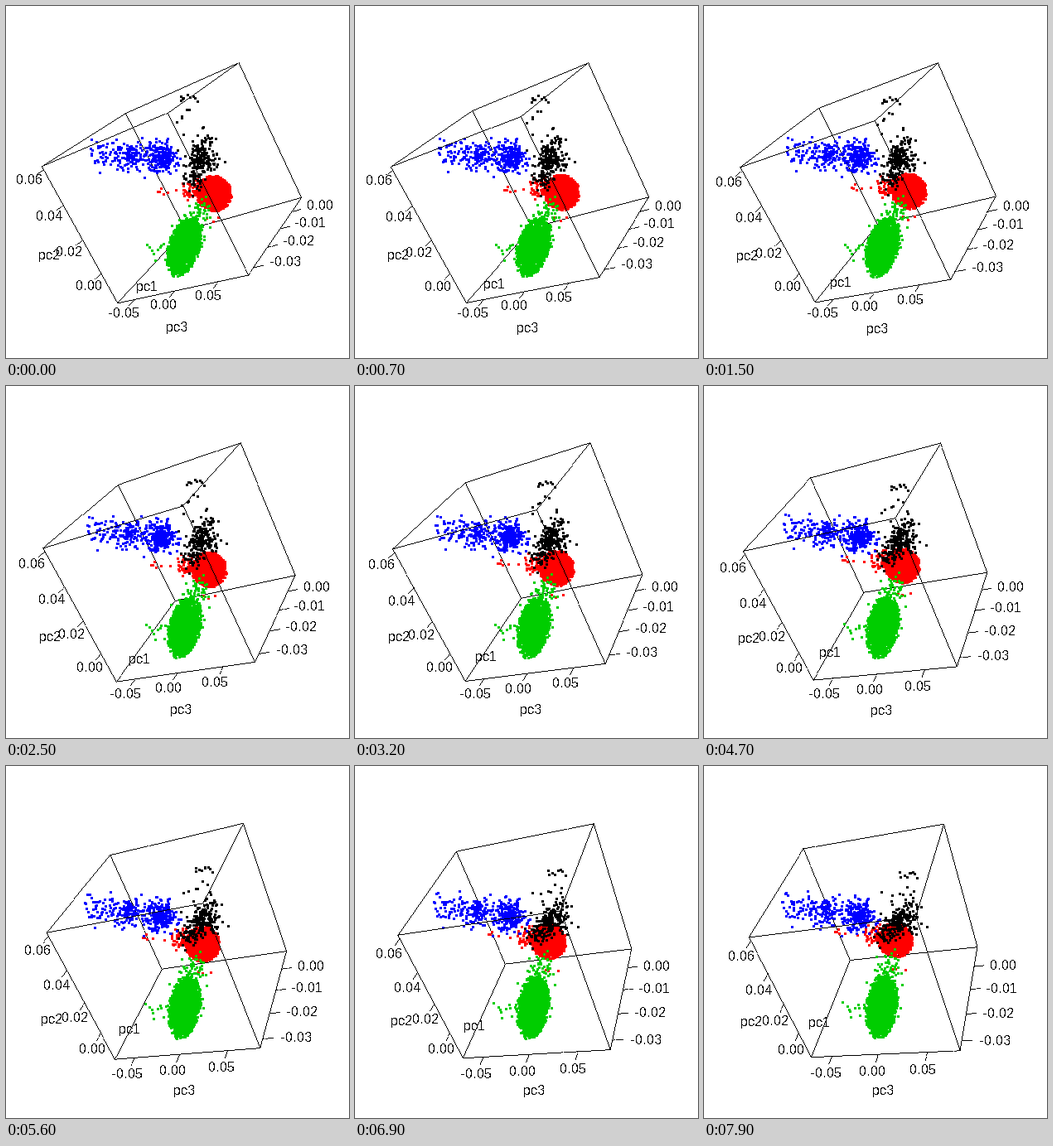
Write a matplotlib script that moves like this. It is 414 px wide and 425 px high and loops after 8 s.

```python
from itertools import combinations, product

import numpy as np
import matplotlib.pyplot as plt
from matplotlib.animation import FuncAnimation

W, H, DPI = 414, 425, 64
PX = 72 / DPI                 # one pixel in points
FRAMES, STEP_MS = 80, 100
SPIN = np.radians(3.0)        # radians per second
AXIS = np.array([2, 1, 2]) / 3
HALF = 93.8                   # half side of the cube in pixels
EYE = W / 2 / np.tan(np.radians(15))

plt.rcParams["text.hinting_factor"] = 1
rng = np.random.default_rng(11)


# ---- camera -------------------------------------------------------------
def start_view():
    right = np.array([0.446, -0.443, 0.777])
    right /= np.linalg.norm(right)
    up = np.array([0.410, 0.870, 0.264])
    up -= right * (up @ right)
    up /= np.linalg.norm(up)
    return np.array([right, up, np.cross(right, up)])


def spin(angle):
    x, y, z = AXIS
    k = np.array([[0, -z, y], [z, 0, -x], [-y, x, 0]])
    return np.eye(3) + np.sin(angle) * k + (1 - np.cos(angle)) * k @ k


VIEW = start_view()


def project(points, view):
    """Return screen positions (y down) and depth toward the viewer."""
    p = HALF * np.asarray(points, float) @ view.T
    scale = 1 / (1 - p[:, 2] / EYE)
    xy = np.column_stack([W / 2 + p[:, 0] * scale, H / 2 - p[:, 1] * scale])
    return xy, p[:, 2]


# ---- point clouds (pc1, pc2, pc3 in cube units) -------------------------
def haze(n, center, spread):
    return center + rng.normal(0, spread, (n, 3))


def solid(n, center, radius, stretch=(0, 0, 0)):
    """Filled ellipsoid: a ball lengthened along one direction."""
    p = rng.normal(size=(n, 3))
    p *= rng.random((n, 1)) ** 0.45 / np.linalg.norm(p, axis=1, keepdims=True)
    return center + radius * p + p[:, :1] * np.array(stretch)


def streak(n, start, end, spread):
    t = rng.random((n, 1))
    return haze(n, np.array(start) * (1 - t) + np.array(end) * t, spread)


RED, GREEN, BLUE = (0.68, -0.5, -0.02), (-0.45, -0.7, -0.03), (0.1, 0.35, -0.13)
BLACK = (0.2, 0.11, 0.36)

CLOUDS = {
    "#ff0000": [
        solid(1700, RED, 0.25),
        streak(130, RED, (0.6, -0.27, -0.36), 0.06),
        haze(5, (0.66, -0.22, -0.78), 0.035),
        haze(5, (0.35, -0.62, 0), 0.09),
    ],
    "#00cd00": [
        solid(1600, GREEN, 0.21, (0.2, 0.15, 0.02)),
        streak(130, GREEN, (0.25, -0.5, 0), 0.08),
        haze(60, GREEN, 0.11),
        haze(9, (-0.6, -0.62, -0.42), 0.07),
    ],
    "#0000ff": [
        haze(220, BLUE, 0.1),
        streak(70, BLUE, (0, 0.69, -0.82), 0.11),
        haze(70, (0.07, 0.52, -0.53), 0.09),
        haze(36, (0, 0.69, -0.84), 0.11),
    ],
    "#000000": [
        streak(130, (0.42, -0.24, -0.1), (0.1, 0.42, 0.62), 0.07),
        haze(100, BLACK, 0.1),
        streak(14, (-0.1, 0.8, 0.6), (-0.1, 0.97, 0.8), 0.09),
    ],
}
cloud = np.clip(np.vstack([p for parts in CLOUDS.values() for p in parts]), -1, 1)
colors = np.concatenate([[c] * sum(map(len, parts))
                         for c, parts in CLOUDS.items()])

# ---- box, ticks and labels ----------------------------------------------
FAR = (1, -1, -1)
edges = [e for e in combinations(product((-1, 1), repeat=3), 2)
         if sum(a != b for a, b in zip(*e)) == 1]
back = [e for e in edges if FAR in e]
front = [e for e in edges if FAR not in e]
anchors = list(-1.3 * (1 - np.eye(3)))
words = ["pc1", "pc2", "pc3"]


def add_scale(values, base, along, zero, per_unit, out, gap):
    """Add tick lines and their labels along one cube edge."""
    for v in values:
        p = np.array(base, float)
        p[along] = zero + per_unit * v
        front.append((p, p + 0.133 * np.array(out)))
        anchors.append(p + gap * np.array(out))
        words.append(f"{v:.2f}")


add_scale((-0.03, -0.02, -0.01, 0.0), (0, -1, 1), 0, 0.57, 47, (0, 0, 1), 0.42)
add_scale((0.0, 0.02, 0.04, 0.06), (-1, 0, -1), 1, -0.55, 25, (-1, 0, 0), 0.26)
add_scale((-0.05, 0.0, 0.05), (-1, -1, 0), 2, -0.055, 12.9, (-1, 0, 0), 0.26)

# ---- figure -------------------------------------------------------------
fig = plt.figure(figsize=(W / DPI, H / DPI), dpi=DPI, facecolor="white")
ax = fig.add_axes([0, 0, 1, 1])
ax.set(xlim=(0, W), ylim=(H, 0))
ax.axis("off")


def squares(size, zorder):
    return ax.scatter([], [], s=(size * PX) ** 2, marker="s", c="black",
                      linewidths=0, antialiased=False, zorder=zorder)


def snap(xy):
    return np.floor(xy) + 0.5


def wire_pixels(segments, view):
    """One-pixel-wide lines as a run of single pixels."""
    xy, _ = project(np.reshape(segments, (-1, 3)), view)
    runs = [np.linspace(a, b, int(np.abs(b - a).max()) + 1)
            for a, b in xy.reshape(-1, 2, 2)]
    return snap(np.vstack(runs))


back_lines, dots, front_lines = squares(1, 1), squares(3, 2), squares(1, 3)
labels = [ax.text(0, 0, w, family="Liberation Sans", size=16 * PX,
                  ha="center", va="baseline", antialiased=False, zorder=4)
          for w in words]


def draw(i):
    view = VIEW @ spin(SPIN * i * STEP_MS / 1000)
    back_lines.set_offsets(wire_pixels(back, view))
    front_lines.set_offsets(wire_pixels(front, view))

    xy, depth = project(cloud, view)
    order = np.argsort(depth)
    dots.set_offsets(snap(xy[order]))
    dots.set_facecolors(colors[order])

    spots, _ = project(anchors, view)
    for label, (x, y) in zip(labels, spots):
        label.set_position((x, y + 8))
    return [back_lines, dots, front_lines, *labels]


anim = FuncAnimation(fig, draw, frames=FRAMES, interval=STEP_MS,
                     repeat=True, repeat_delay=0)
plt.show()
```
